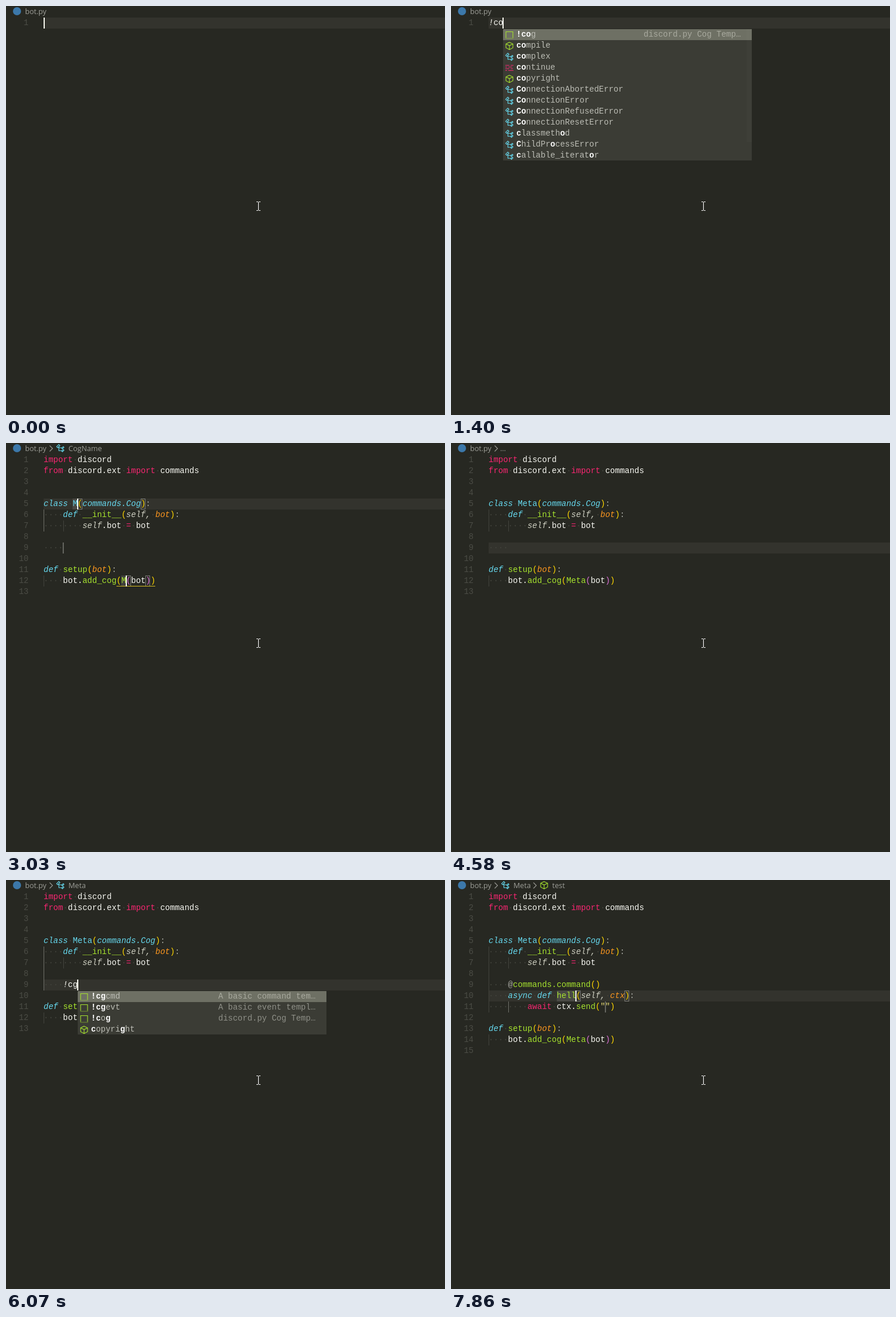
An HTML page for the animation above (8 s loop, 759 by 707 pixels).

```html
<!DOCTYPE html>
<html lang="en">
<head>
<meta charset="utf-8">
<title>bot.py</title>
<style>
html, body { margin: 0; width: 100%; height: 100%; overflow: hidden; background: #272822; }
#stage { position: absolute; inset: 0; overflow: hidden; color: #f8f8f2;
  font: 14px/19px "Liberation Mono", monospace; white-space: pre; }
#stage div, #stage > svg, .row svg { position: absolute; }
svg { fill: none; stroke-width: 1.1; overflow: visible; }
.crumb { font: 12.6px/19px "Open Sans", sans-serif; color: #9d9e98; top: 0; }
.num { width: 39px; text-align: right; color: #4b4c45; }
.w { color: #42433c; font-style: normal; }
.p { color: #f92672; }
.c { color: #66d9ef; font-style: italic; }
.t { color: #66d9ef; }
.g { color: #a6e22e; }
.o { color: #fd971f; font-style: italic; }
.s { color: #cfd0c2; font-style: italic; }
.y { color: #ffd700; }
.m { color: #da70d6; }
.q { color: #e6db74; }
.d { color: #a9aaa2; }
.i { font-style: italic; }
.pop { width: 430px; background: #3b3c35; overflow: hidden; color: #bcbdb5; }
.row { left: 0; width: 430px; height: 19px; }
.row:first-child { background: #6e7064; }
.row b { color: #fff; }
.row div { left: 23px; }
.row .detail { left: 243px; color: #8f9088; }
.row:first-child .detail { color: #a9aa9f; }
</style>
</head>
<body>
<div id="stage"></div>
<script>
const stage = document.getElementById('stage');
const LOOP = 8000, LEFT = 65, CHAR = 8.4, ROW = 19;
const colX = c => LEFT + CHAR * c;
const lineY = n => 1 + ROW * n;

const icons = {
  s: ['#a6e22e', '<path d="M2 13V2.5H14V13"/><path d="M1.5 14h13" stroke-dasharray="1 1"/>'],
  m: ['#a6e22e', '<path d="M8 1.7 14 4.6V11.2L8 14.4 2 11.2V4.6ZM2 4.6 8 7.6 14 4.6M8 7.6V14.4"/>'],
  c: ['#66d9ef', '<path d="M1.5 5.3 5.3 1.5 7.2 3.4 3.4 7.2ZM5.4 5.5V12.3H11M5.4 7.3H11M10.4 8l2.6-2.6 1.2 1.2-2.6 2.6ZM10.4 13l2.6-2.6 1.2 1.2-2.6 2.6Z"/>'],
  k: ['#f92672', '<path d="M1 3.5h7M10 3.5h5M1 6.5h3M6 6.5h7M1 9.5h7M10 9.5h4M1 12.5h3M6 12.5h9"/>']
};
const icon = (kind, x, y) => `<svg width="16" height="16" style="left:${x}px;top:${y}px" stroke="${icons[kind][0]}">${icons[kind][1]}</svg>`;
const box = (x, y, w, h, css) => `<div style="left:${x}px;top:${y}px;width:${w}px;height:${h}px;${css}"></div>`;

// Markup: a class letter followed by `text`; every space shows as a faint dot.
const paint = src => src
  .replace(/ /g, '\u00b7')
  .replace(/(\w)`(.*?)`/g, '<span class="$1">$2</span>')
  .replace(/<span class/g, '<span\u0000class')
  .replace(/\u00b7+/g, '<span class="w">$&</span>')
  .replace(/\u0000/g, ' ');

// Completion entries: icon letter, label, optional detail.
const cog = 's !cog|discord.py Cog Temp…';
const cmd = 's !cgcmd|A basic command tem…';
const evt = 's !cgevt|A basic event templ…';
const copyright = 'm copyright';
const lists = {
  '1!c': [cog, cmd, evt, 'm callable', 'm chr', 'k class', 'c classmethod', 'm compile', 'c complex', 'k continue', copyright, 'c ChildProcessError'],
  '1!co': [cog, 'm compile', 'c complex', 'k continue', copyright, 'c ConnectionAbortedError', 'c ConnectionError',
    'c ConnectionRefusedError', 'c ConnectionResetError', 'c classmethod', 'c ChildProcessError', 'c callable_iterator'],
  '1!cog': [cog, copyright],
  '9!cg': [cmd, evt, cog, copyright],
  '9!cgc': [cmd],
  '9!cgcm': [cmd]
};
lists['9!c'] = [cmd, evt, cog, ...lists['1!c'].slice(3)];

function mark(label, query) {
  const rest = [...query.toLowerCase()];
  if (label[0] !== '!') rest.shift();
  return [...label].map(ch => ch.toLowerCase() === rest[0] ? (rest.shift(), `<b>${ch}</b>`) : ch).join('');
}

function popup(line, col, query) {
  const items = lists[line + query];
  const rows = items.map((item, i) => {
    const [label, detail = ''] = item.slice(2).split('|');
    return `<div class="row" style="top:${i * ROW}px">${icon(item[0], 3, 2)}<div>${mark(label, query)}</div><div class="detail">${detail}</div></div>`;
  }).join('');
  const bar = items.length > 9 ? box(421, 0, 9, 195, 'background:rgba(255,255,255,.015)') : '';
  return `<div class="pop" style="left:${Math.round(colX(col))}px;top:${lineY(line + 1) + 1}px;height:${items.length * ROW - 1}px">${rows}${bar}</div>`;
}

function code(s) {
  const typed = s.typed.replace('!', 'i`!`');
  if (!s.name) return [typed];
  const middle = s.fn
    ? ['    d`@`g`commands.command`y`()`',
       `    c\`async def\` g\`${s.fn}\`y\`(\`s\`self, \`o\`ctx\`y\`)\`d\`:\``,
       '        p`await` ctx.g`send`y`(`q`""`y`)`']
    : ['    ' + typed];
  return ['p`import` discord', 'p`from` discord.ext p`import` commands', '', '',
    `c\`class\` t\`${s.name}\`y\`(\`c\`commands.Cog\`y\`)\`d\`:\``,
    '    c`def` g`__init__`y`(`s`self, `o`bot`y`)`d`:`',
    '        s`self`.bot p`=` bot', '',
    ...middle, '',
    'c`def` g`setup`y`(`o`bot`y`)`d`:`',
    `    bot.g\`add_cog\`y\`(\`g\`${s.name}\`m\`(\`botm\`)\`y\`)\``, ''];
}

function crumbs(s) {
  const chevron = x => `<svg width="8" height="10" style="left:${x}px;top:4px" stroke="#9d9e98"><path d="M.5.5 5.5 5.5.5 10.5"/></svg>`;
  const text = (x, t) => `<div class="crumb" style="left:${x}px">${t}</div>`;
  let html = box(12, 2, 14, 14, 'border-radius:50%;background:#3c78aa') + text(33, 'bot.py');
  if (s.crumb === '…') return html + chevron(75) + text(85, '…');
  s.crumb.split(' ').filter(Boolean).forEach((name, i) => {
    const x = 75 + 67 * i;
    html += chevron(x) + icon('cm'[i], x + 11, 1) + text(x + 33, name);
  });
  return html;
}

function view(s) {
  const lines = code(s), n = s.name.length;
  const bars = [], words = [], pairs = [], guides = [];
  const guide = (level, from, to, active) => guides.push([level, from, to, active]);
  let cursors, under = '';

  if (!s.name) cursors = [[1, s.typed.length]];
  else if (s.field) {
    cursors = [[5, 6 + n], [12, 16 + n]];
    words.push([5, 6, n], [12, 16, n]);
    pairs.push([5, 6 + n], [5, 19 + n], [12, 16 + n], [12, 20 + n]);
    bars.push([9, 4]);
    under = box(colX(15), lineY(13) - 1, CHAR * (n + 7), 1, 'background:#d6bd22');
  } else if (s.fn) {
    const f = s.fn.length;
    cursors = [[10, 14 + f]];
    words.push([10, 14, f]);
    pairs.push([10, 14 + f], [10, 24 + f]);
    bars.push([11, 24]);
  } else cursors = [[9, 4 + s.typed.length]];

  if (s.name) {
    guide(0, 6, s.fn ? 11 : s.typed ? 9 : 7, s.field || (s.typed && !s.fn));
    guide(4, 7, 7);
    if (s.fn) guide(4, 11, 11, true);
    guide(0, lines.length - 1, lines.length - 1);
  }

  const [line, col] = cursors[0];
  let html = crumbs(s);
  if (!s.sel) html += box(LEFT, lineY(line), 694, ROW, 'background:#33332d');
  const shade = s.sel ? 'rgba(135,139,145,.5)' : 'rgba(124,124,124,.3)';
  for (const [l, c, w] of words) html += box(colX(c), lineY(l), CHAR * w, ROW, 'background:' + shade);
  for (const [level, from, to, active] of guides)
    html += box(Math.round(colX(level)), lineY(from), 1, ROW * (to - from + 1), `background:${active ? '#70716a' : '#43443d'}`);
  lines.forEach((src, i) => {
    const top = `top:${lineY(i + 1)}px`;
    html += `<div class="num" style="${top}">${i + 1}</div><div style="left:${LEFT}px;${top}">${paint(src)}</div>`;
  });
  for (const [l, c] of pairs) html += box(Math.round(colX(c)), lineY(l), 8, ROW, 'box-sizing:border-box;border:1px solid #7d7d78');
  html += under;
  for (const [l, c] of bars) html += box(Math.round(colX(c) - 1), lineY(l), 2, ROW, 'background:#656660');
  if (s.on) for (const [l, c] of cursors)
    html += box(Math.round(colX(c) - (c ? 1 : 0)), lineY(l), 2, ROW, 'background:#f8f8f0');
  if (s.pop) html += popup(line, col, s.typed);
  // Mouse pointer
  html += '<svg width="8" height="17" style="left:433px;top:338px" stroke="#fff"><path d="M0 .5H3M4 .5H7M3.5 1V15M0 15.5H3M4 15.5H7"/></svg>';
  return html;
}

// Each step changes part of the state from its time on.
const steps = [
  [0, { typed: '', name: '', fn: '', crumb: '', field: false, sel: false, pop: false, on: true }],
  [390, { on: false }],
  [780, { typed: '!', on: true }],
  [1250, { typed: '!c' }],
  [1330, { pop: true }],
  [1400, { typed: '!co' }],
  [1630, { typed: '!cog' }],
  [2020, { typed: '', pop: false, name: 'CogName', field: true, sel: true }],
  [2400, { crumb: 'CogName' }],
  [2480, { on: false }],
  [3030, { name: 'M', sel: false, on: true }],
  [3180, { name: 'Me' }],
  [3340, { name: 'Met' }],
  [3490, { name: 'Meta' }],
  [3870, { crumb: 'Meta' }],
  [3950, { on: false }],
  [4110, { field: false, on: true }],
  [4270, { crumb: '…' }],
  [4580, { on: false }],
  [5040, { on: true }],
  [5280, { typed: '!' }],
  [5670, { crumb: 'Meta' }],
  [5830, { typed: '!c' }],
  [5910, { pop: true }],
  [6070, { typed: '!cg' }],
  [6220, { typed: '!cgc' }],
  [6450, { typed: '!cgcm' }],
  [6760, { typed: '', pop: false, fn: 'test', sel: true }],
  [6920, { crumb: 'Meta test' }],
  [7310, { on: false }],
  [7390, { fn: 'h', sel: false, on: true }],
  [7550, { fn: 'he' }],
  [7710, { fn: 'hel' }],
  [7860, { fn: 'hell' }]
];

const start = performance.now();
let shown = 0;
function tick() {
  const t = (performance.now() - start) % LOOP;
  const past = steps.filter(step => step[0] <= t);
  if (past.length !== shown) {
    shown = past.length;
    stage.innerHTML = view(Object.assign({}, ...past.map(step => step[1])));
  }
  requestAnimationFrame(tick);
}
tick();
</script>
</body>
</html>
```
